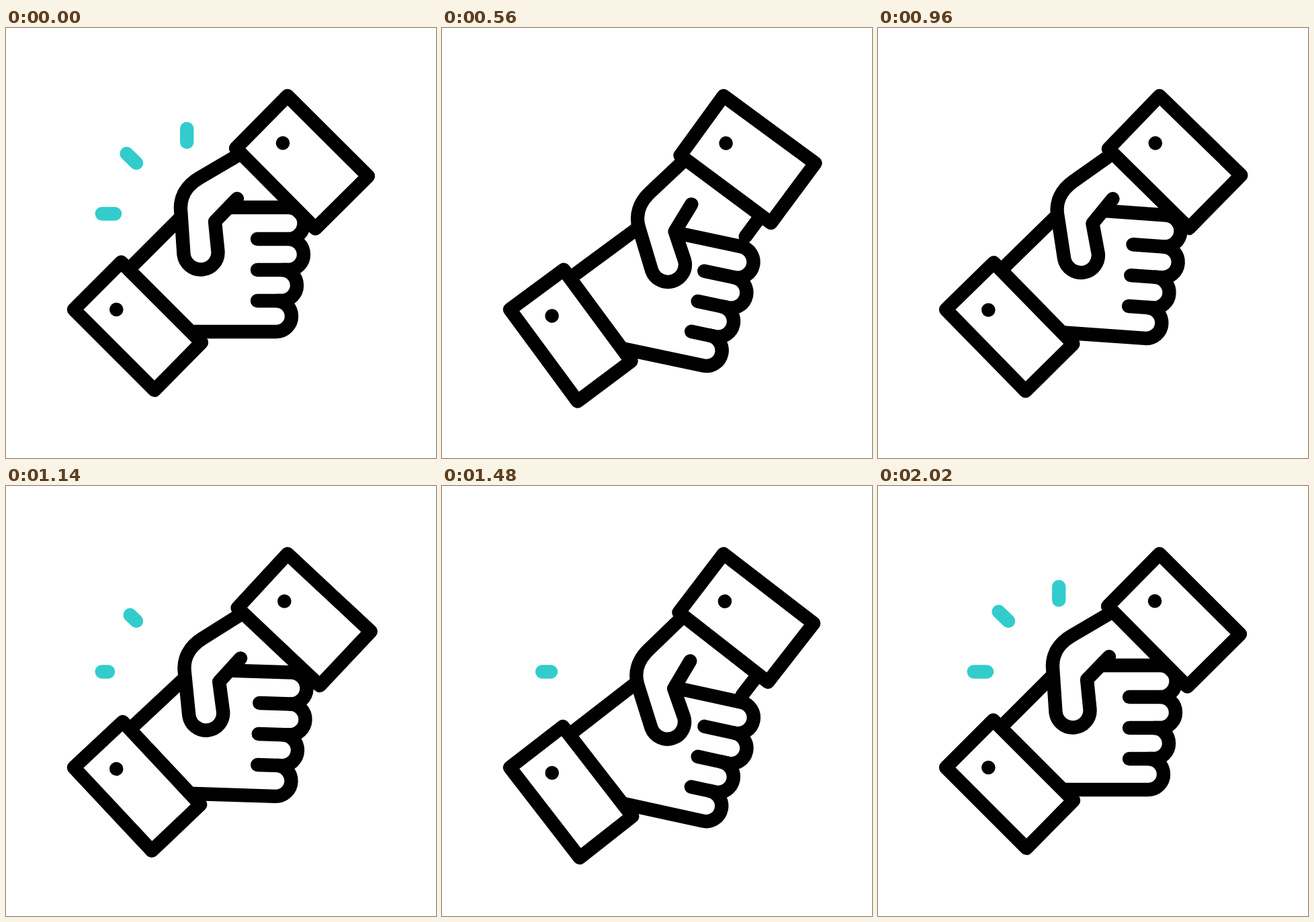
An HTML page for the animation above (2220 ms loop, 640 by 640 pixels).

```html
<!DOCTYPE html>
<html lang="en">
<head>
<meta charset="utf-8">
<title>Handshake</title>
<style>
  html, body { margin: 0; width: 100%; height: 100%; overflow: hidden; background: #fff; }
  svg { display: block; width: 100%; height: 100%; }
  .ink { fill: #fff; stroke: #000; stroke-width: 20.4; stroke-linecap: round; stroke-linejoin: round; }
  .line { fill: none; }
  .button { fill: #000; stroke: none; }
  .spark { stroke: #33cccc; stroke-width: 20.4; stroke-linecap: round; }
</style>
</head>
<body>
<svg viewBox="0 0 640 640">
  <g id="sparks"></g>
  <g class="ink">
    <path class="upper line" d="M449 284L420 313"/>
    <path class="lower line" d="M185 357L273 269"/>
    <g class="lower">
      <g id="fist">
        <path d="M325 267H420a23.5 23.5 0 0 1 0 47a23 23 0 0 1 0 46H410a23 23 0 0 1 0 46H402a23 23 0 0 1 0 46H275"/>
        <path class="line" d="M374 314H420M374 360H420M374 406H410"/>
      </g>
    </g>
    <g class="upper">
      <path id="thumb" d="M346 189L288 223C269 234 259 251 260 270L264.5 337A25.6 25.6 0 0 0 315.5 333L311 288L344 254"/>
    </g>
    <g class="lower">
      <path d="M101 419L171.5 348.5L291 468L221 539Z"/>
      <circle class="button" cx="164.3" cy="419" r="10.3"/>
    </g>
    <g class="upper">
      <path d="M419 101L539 220.5L460.5 298.5L342 179Z"/>
      <circle class="button" cx="412" cy="171.3" r="10.3"/>
    </g>
  </g>
</svg>
<script>
const LOOP = 2220, STEP = 20;
const SWING = 8.6, FIST_BEND = 6, THUMB_BEND = 7.5;

// [time, amount] pairs, eased in and out between neighbours
const swingKeys = [[85, 0], [540, 1], [555, 1], [1047, 0], [1347, 1], [1860, 0]];
const bendKeys = [[325, 0], [760, 1], [810, 1], [1135, 0], [1600, 1], [1610, 1], [2020, 0]];

// Each spark leaves outward and regrows from the hand, three times
const CYCLE = 406, SHRINK = 70, GROW = 90, ROUNDS = 3;
const sparks = [
  { near: [162, 276.5], far: [142.7, 276.5], start: 292, lateEnd: 0 },
  { near: [194, 201], far: [179.5, 187], start: 360, lateEnd: 0 },
  { near: [269.2, 169.7], far: [269.2, 150], start: 430, lateEnd: 75 }
];

const all = selector => document.querySelectorAll(selector);
const clamp = x => Math.min(1, Math.max(0, x));
const mix = (a, b, k) => a + (b - a) * k;
const ease = x => (1 - Math.cos(Math.PI * clamp(x))) / 2;

function track(keys, t) {
  let value = keys[0][1];
  for (let i = 1; i < keys.length; i++) {
    const [t0, v0] = keys[i - 1], [t1, v1] = keys[i];
    if (t >= t0) value = mix(v0, v1, ease((t - t0) / (t1 - t0)));
  }
  return value;
}

function rotate(nodes, angle, x, y) {
  nodes.forEach(node => node.setAttribute('transform', `rotate(${angle} ${x} ${y})`));
}

// Visible part of a spark, as fractions from its near end to its far end
function visibleSpan({ start, lateEnd }, t) {
  const round = Math.floor((t - start) / CYCLE);
  if (round < 0) return [0, 1];
  const index = Math.min(round, ROUNDS - 1);
  const local = t - start - index * CYCLE;
  const growAt = CYCLE - GROW + (index === ROUNDS - 1 ? lateEnd : 0);
  return local < growAt ? [clamp(local / SHRINK), 1] : [0, clamp((local - growAt) / GROW)];
}

function drawSpark(spark, t) {
  const [from, to] = visibleSpan(spark, t);
  const { near, far, node } = spark;
  const point = k => [mix(near[0], far[0], k), mix(near[1], far[1], k)];
  const [x1, y1] = point(from), [x2, y2] = point(to);
  node.setAttribute('d', to > from ? `M${x1} ${y1}L${x2} ${y2}` : '');
}

const sparkLayer = document.getElementById('sparks');
for (const spark of sparks) {
  spark.node = document.createElementNS('http://www.w3.org/2000/svg', 'path');
  spark.node.setAttribute('class', 'spark');
  sparkLayer.append(spark.node);
}
const lower = all('.lower'), upper = all('.upper'), fist = all('#fist'), thumb = all('#thumb');

function draw(t) {
  const swing = SWING * track(swingKeys, t);
  const bend = track(bendKeys, t);
  rotate(lower, swing, 101, 419);
  rotate(upper, -swing, 419, 101);
  rotate(fist, FIST_BEND * bend, 289, 390);
  rotate(thumb, -THUMB_BEND * bend, 338, 204);
  sparks.forEach(spark => drawSpark(spark, t));
}

const begin = performance.now();
function tick() {
  const t = (performance.now() - begin) % LOOP;
  draw(Math.floor(t / STEP) * STEP);
  requestAnimationFrame(tick);
}
tick();
</script>
</body>
</html>
```
